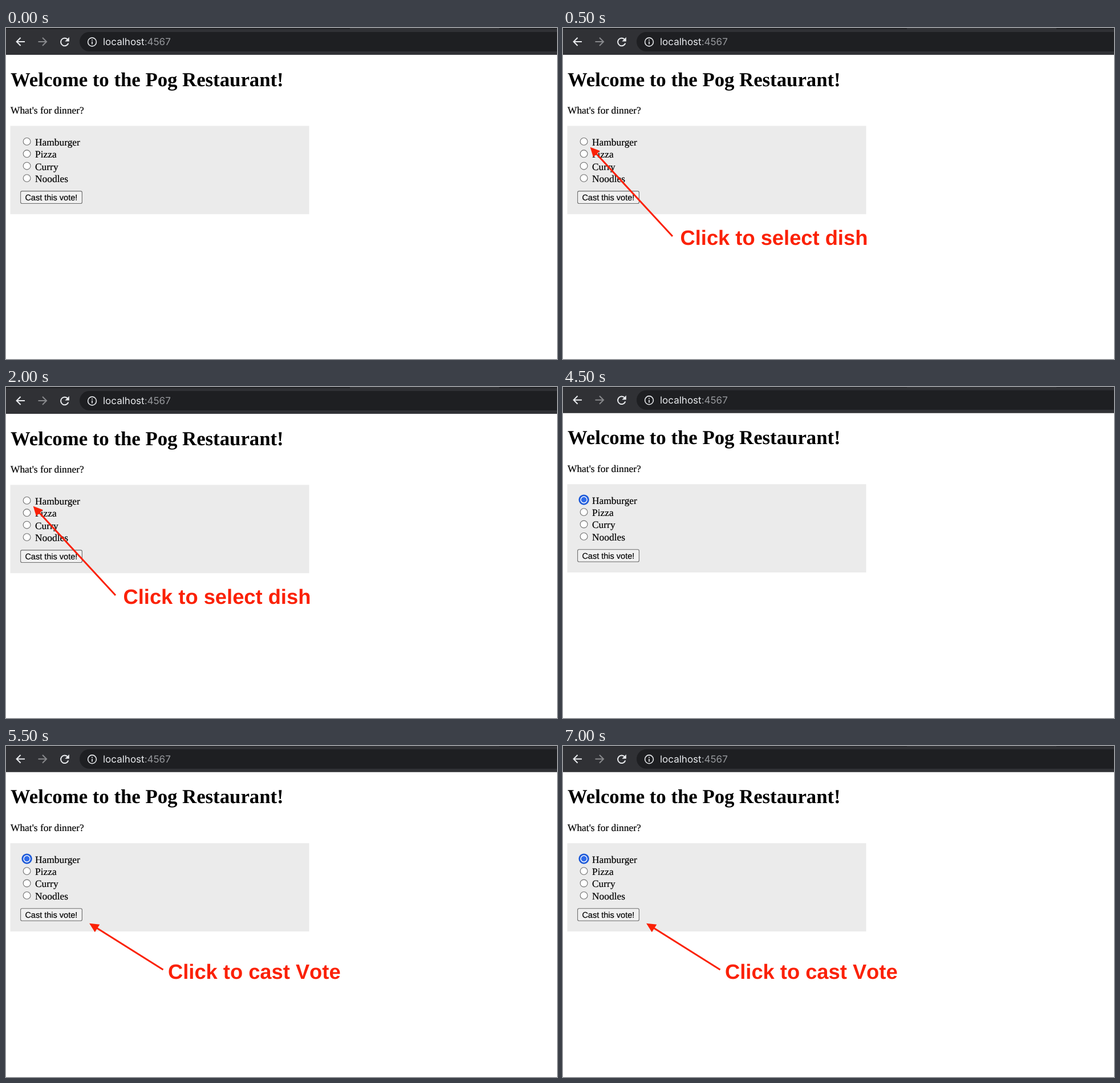
An HTML page that plays this animation: 966 by 580 pixels, repeating every 8 s.

```html
<!DOCTYPE html>
<html lang="en">
<head>
<meta charset="utf-8">
<title>Dinner vote</title>
<style>
  html, body { margin: 0; height: 100%; overflow: hidden; background: #fff; }
  svg { display: block; width: 966px; height: 580px; text-rendering: geometricPrecision; }
  .serif { font: 17.4px "Liberation Serif", Times, serif; }
  .serif text, .button { stroke: #000; stroke-width: .2; }
  .serif .title { font-size: 34.75px; font-weight: bold; stroke: none; }
  .button { font: 14.5px "Liberation Sans", Arial, sans-serif; }
  .url { font: 17px Inter, sans-serif; fill: #e8eaed; }
  .note { font: bold 36.3px "Liberation Sans", Arial, sans-serif; font-kerning: none; fill: #fb2106; }
  .icon { fill: none; stroke: #e8eaed; stroke-width: 2; }
</style>
</head>
<body>
<svg viewBox="0 0 966 580">
  <g id="page">
    <path fill="#303135" d="M0-2H966V47H0Z"/>
    <path fill="#1e1f22" d="M0-2H600Q603-2 603 2H0ZM966-2H868Q865-2 865 2H966Z"/>
    <path fill="#1e1f22" d="M966 7H146a17 17 0 0 0 0 34H966Z"/>
    <g class="icon">
      <path d="M33 24H19M25.6 17L18.6 24L25.6 31"/>
      <path stroke="#88898c" d="M56.5 24H70.5M64 17L71 24L64 31"/>
      <path d="M107.6 19.6A6.8 6.8 0 1 0 109.3 26.6"/>
      <path fill="#e8eaed" stroke="none" d="M110.8 16V23.4H103.4Z"/>
      <circle cx="151" cy="24.5" r="7.4" stroke-width="1.6"/>
      <path stroke-width="1.7" d="M151 20.2V21.9M151 23.6V28.6"/>
    </g>
    <text class="url" x="170" y="30">localhost<tspan fill="#97999d">:4567</tspan></text>
    <g class="serif">
      <text class="title" x="8" y="101.6">Welcome to the Pog Restaurant!</text>
      <text x="8" y="150">What's for dinner?</text>
      <path fill="#ebebeb" d="M7.5 171.5H531.5V326.2H7.5Z"/>
      <g id="dishes"></g>
    </g>
    <g id="picked">
      <circle cx="36.6" cy="198.8" r="9.2" fill="#1f5bd8"/>
      <circle cx="36.6" cy="198.8" r="5.6" fill="#2f6bea" stroke="#fff" stroke-width="1.4"/>
    </g>
    <rect x="25.6" y="285.9" width="107.8" height="21.6" rx="2.6" fill="#f0f0f0" stroke="#6c6c6c" stroke-width="1.1"/>
    <text class="button" x="33.4" y="302.2">Cast this vote!</text>
  </g>
  <g id="selectNote"></g>
  <g id="voteNote"></g>
</svg>
<script>
const el = id => document.getElementById(id);

el("dishes").innerHTML = ["Hamburger", "Pizza", "Curry", "Noodles"].map((dish, i) => {
  const y = 198.9 + i * 21.4;
  return `<circle cx="36.6" cy="${y}" r="6.4" fill="#fff" stroke="#717171" stroke-width="1.1"/>
    <text x="51" y="${y + 7}">${dish}</text>`;
}).join("");

// Red label with an arrow running from its tail to its tip.
function note(id, label, x, y, tip, tail) {
  const dx = tail[0] - tip[0], dy = tail[1] - tip[1];
  const angle = Math.atan2(dy, dx) * 180 / Math.PI;
  el(id).innerHTML = `<g transform="translate(${tip}) rotate(${angle})" fill="#fb2106">
      <path d="M-.5 0L16-8V-1.5H${Math.hypot(dx, dy)}V1.5H16V8Z"/></g>
    <text class="note" x="${x}" y="${y}">${label}</text>`;
}
note("selectNote", "Click to select dish", 205.5, 380, [48, 209], [192, 365]);
note("voteNote", "Click to cast Vote", 284, 408.3, [146.5, 311], [275.5, 392]);

const show = (id, on) => { el(id).style.display = on ? "" : "none"; };

function draw(now) {
  const t = now % 8000;
  const picked = t >= 3000;
  el("page").setAttribute("transform", `translate(0 ${picked ? -1.2 : 0})`);
  show("picked", picked);
  show("selectNote", t >= 500 && !picked);
  show("voteNote", t >= 5500);
}

const start = performance.now();
function loop() {
  draw(performance.now() - start);
  requestAnimationFrame(loop);
}
loop();
</script>
</body>
</html>
```
